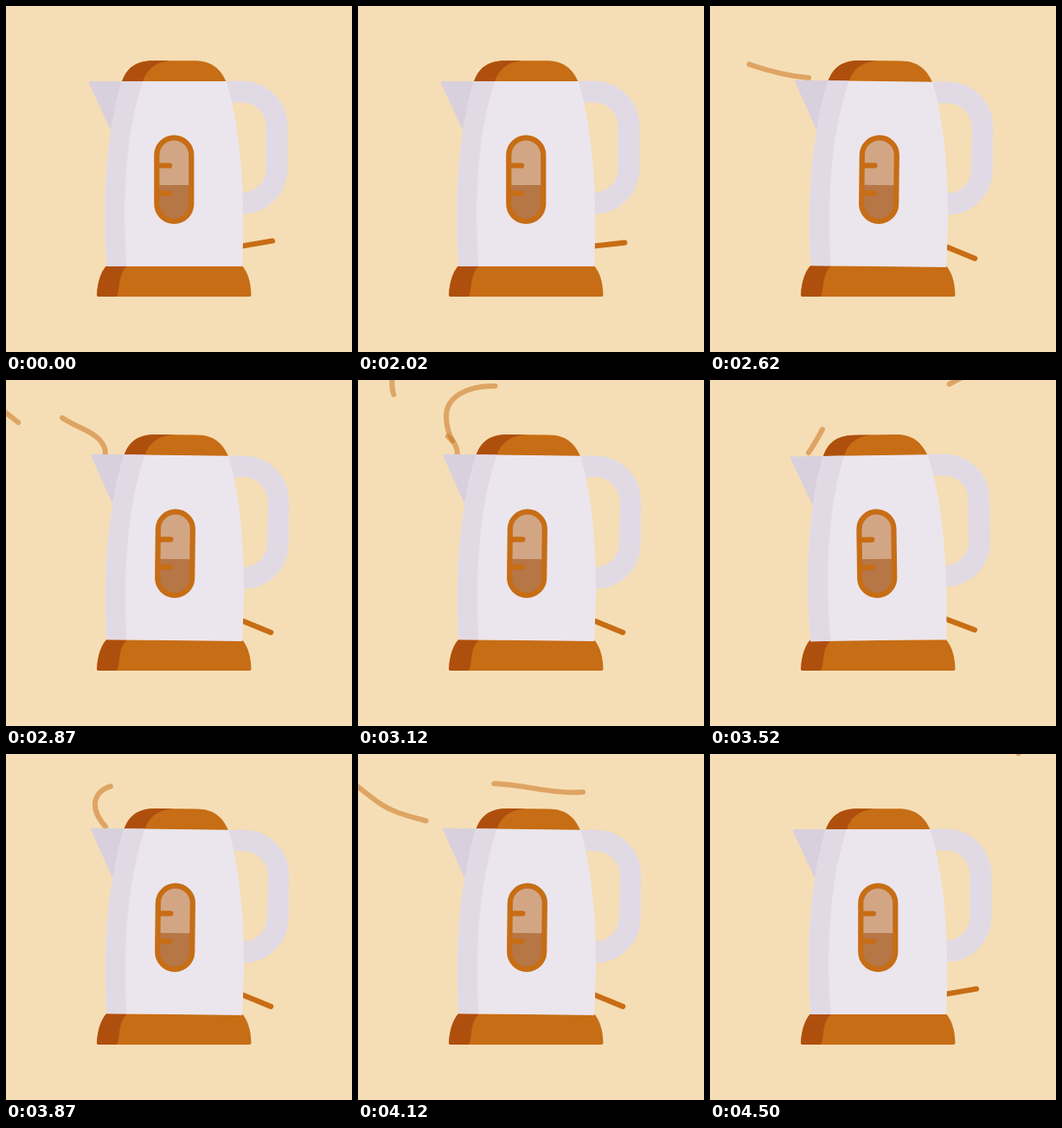
An HTML page that plays this animation: 400 px wide and 400 px high, repeating every 5020 ms.

```html
<!DOCTYPE html>
<html lang="en">
<head>
<meta charset="utf-8">
<title>Boiling kettle</title>
<style>
  html, body { margin: 0; width: 100%; height: 100%; overflow: hidden; background: #f5deb5; }
  svg { display: block; width: 100vw; height: 100vh; }
  .orange { fill: #c76d15; }
  .rust { fill: #af4f0d; }
  .line { fill: none; stroke: #c76d15; stroke-width: 6.2; stroke-linecap: round; }
  #steam path { fill: none; stroke: #c76d15; stroke-opacity: .5; stroke-width: 6; stroke-linecap: round; }
</style>
</head>
<body>
<svg viewBox="0 0 400 400">
  <g id="steam"></g>

  <g id="base">
    <path class="orange" d="M116 300.5H273C279 307 283 318 283.5 334Q283.5 336 281.5 336H107Q105 336 105 334C106 318 110 307 116 300.5Z"/>
    <path class="rust" d="M116 300.5H140C132 308 131.500 318 130 330Q129.500 336 126 336H107Q105 336 105 334C106 318 110 307 116 300.5Z"/>
  </g>

  <g id="kettle">
    <path id="lever" class="line" d="M273 277.500H308.500"/>
    <path d="M255 99.200H273A40 40 0 0 1 313 139.200V188A40 40 0 0 1 273 228" fill="none" stroke="#e1dae5" stroke-width="24.800"/>
    <path d="M97.500 87H140L124 150L96.200 90Q95 87 97.500 87Z" fill="#d9d0dd"/>
    <path class="orange" d="M134 87.500C139 73 149 63.300 170 63.300H218C238 63.300 248 73 254.500 87.500Z"/>
    <path class="rust" d="M134 87.500C139 73 149 63.300 170 63.300H190C172 65 162 74 158 87.500Z"/>
    <path d="M134 87C118 140 110 215 116.500 301H273C277 215 271 140 254.500 87Z" fill="#ebe6ed"/>
    <path d="M134 87C118 140 110 215 116.500 301H139.500C133 205 142 137 158 87Z" fill="#e1dae5"/>

    <rect x="174.300" y="152.400" width="40" height="96.400" rx="20" fill="#d2a685"/>
    <path d="M174.300 207H214.300V228.800A20 20 0 0 1 174.300 228.800Z" fill="#b67646"/>
    <path class="line" d="M175 184.500H189M175 216.500H189"/>
    <rect class="line" x="174.300" y="152.400" width="40" height="96.400" rx="20"/>
  </g>
</svg>

<script>
const LOOP = 5020;
const SPEED = 0.56;  // steam, px per ms
const LAG = 185;     // delay of a wisp's tail behind its head, ms

const PATHS = {
  left: 'M114 83C92 81 70 76 47 68S12 46 -8 32',
  rise: 'M115 86C115 72 105 64 88 56C60 43 32 26 41 -8',
  arch: 'M115 86C114 72 102 66 102 42C102 20 125 7 156 7C187 7 205 15 232 15S272 8 300 -8',
  up:   'M114 84C121 74 125 66 130 57C140 40 150 25 148 -8',
  wave: 'M115 84C107 75 102 66 103 56C105 44 114 38 127 36C180 28 220 50 270 43S335 20 362 -6'
};

const WISPS = [
  ['left', 2495], ['rise', 2748], ['arch', 2906], ['rise', 3077],
  ['up', 3465], ['wave', 3766], ['left', 3872]
];

const $ = id => document.getElementById(id);
const clamp = (v, lo = 0, hi = 1) => Math.min(hi, Math.max(lo, v));
const kettle = $('kettle');
const lever = $('lever');

const wisps = WISPS.map(([name, start]) => {
  const el = document.createElementNS('http://www.w3.org/2000/svg', 'path');
  el.setAttribute('d', PATHS[name]);
  $('steam').append(el);
  return { el, start, length: el.getTotalLength() };
});

function leverAngle(t) {
  let down = 0;
  if (t >= 2020) down = clamp(0.11 + 0.89 * (t - 2020) / 250);
  if (t >= 4250) down = clamp((4500 - t) / 250);
  return -9.7 + 31.2 * down;
}

function shakeAngle(t) {
  const start = 2457, period = 250, cycles = 8;
  const phase = (t - start) / period;
  return phase > 0 && phase < cycles ? -0.84 * Math.sin(2 * Math.PI * phase) : 0;
}

function drawWisp({ el, start, length }, t) {
  const head = clamp((t - start) * SPEED, 0, length);
  const tail = clamp((t - start - LAG) * SPEED, 0, length);
  const visible = head > tail;
  el.style.display = visible ? '' : 'none';
  if (visible) {
    el.setAttribute('stroke-dasharray', `${head - tail} 2000`);
    el.setAttribute('stroke-dashoffset', -tail);
  }
}

function render(t) {
  lever.setAttribute('transform', `rotate(${leverAngle(t)} 273 277.5)`);
  kettle.setAttribute('transform', `rotate(${shakeAngle(t)} 194 301)`);
  wisps.forEach(w => drawWisp(w, t));
}

const began = performance.now();
function tick() {
  render((performance.now() - began) % LOOP);
  requestAnimationFrame(tick);
}
tick();
</script>
</body>
</html>
```
